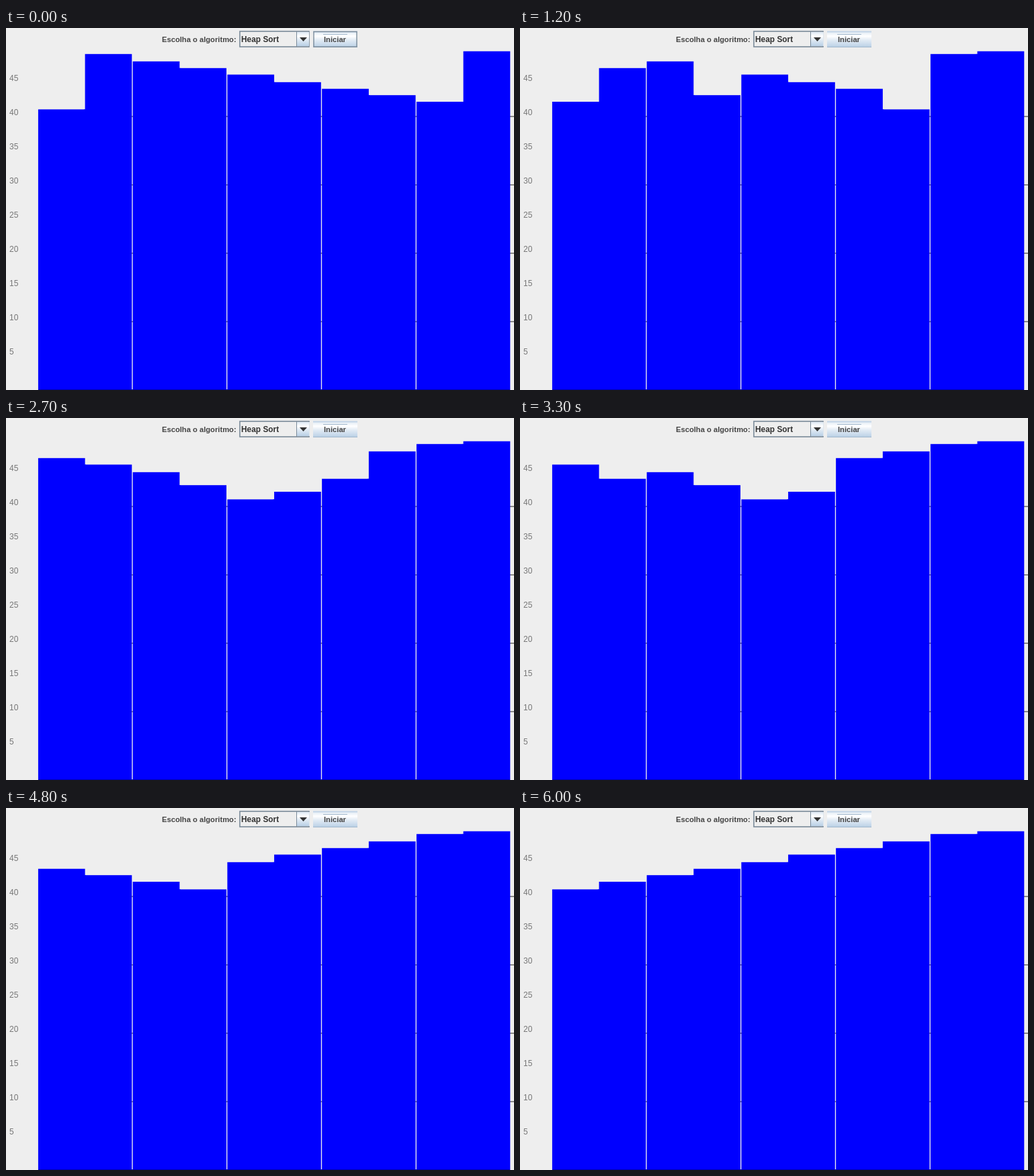
Recreate the animation shown at these times as an HTML page. Size 756 px wide and 540 px high, loop 6300 ms.

```html
<!DOCTYPE html>
<html lang="pt">
<head>
<meta charset="utf-8">
<title>Heap Sort</title>
<style>
  html, body { margin: 0; width: 100%; height: 100%; overflow: hidden; background: #eee; }
  svg { display: block; }
  text { font: bold 11.2px "Liberation Sans", Arial, sans-serif; fill: #444; }
  #labels text { font-weight: normal; font-size: 12px; fill: #777; }
  #combo { font-size: 11.9px; fill: #333; }
</style>
</head>
<body>
<svg width="756" height="540" viewBox="0 0 756 540">
  <defs>
    <linearGradient id="ocean" x2="0" y2="1">
      <stop offset="0" stop-color="#dde8f3"/>
      <stop offset=".3" stop-color="#fff"/>
      <stop offset=".5" stop-color="#e6eef6"/>
      <stop offset="1" stop-color="#b8cfe5"/>
    </linearGradient>
  </defs>
  <g id="grid" stroke="#666" stroke-width="1.4"></g>
  <g id="labels"></g>
  <g id="bars" fill="#00f"></g>
  <path d="M48 539.5H750" stroke="#0000b4"/>

  <text x="232" y="21">Escolha o algoritmo:</text>
  <rect x="348" y="5" width="103" height="23" fill="#eee" stroke="#7a8a99" stroke-width="1.6"/>
  <rect x="433" y="6" width="18" height="21" fill="url(#ocean)"/>
  <path d="M432.5 5V28" stroke="#7a8a99"/>
  <path d="M437 14H448L442.5 20Z" fill="#333"/>
  <text id="combo" x="350" y="20.5">Heap Sort</text>

  <rect x="457" y="5" width="66" height="24" fill="url(#ocean)"/>
  <path d="M457 5.5H523" stroke="#c3d5e8" stroke-width="2"/>
  <path d="M457 28.3H523" stroke="#a3b8cc"/>
  <path d="M472 9.5H508" stroke="#a3b8cc"/>
  <text x="473" y="21">Iniciar</text>
  <rect id="outline" x="458" y="5.5" width="64" height="22.5" fill="none" stroke="#7a8a99" stroke-width="1.4"/>
  <path id="edge" d="M451.5 6V27" stroke="#dde6ee"/>
</svg>
<script>
const STEP = 300;
const TOPS = [121.4, 110, 100.2, 90.7, 80.8, 69.5, 59.8, 49.8, 38.8, 34.7]; // smallest value first
const $ = id => document.getElementById(id);

function add(parent, tag, attrs, content = '') {
  const el = document.createElementNS('http://www.w3.org/2000/svg', tag);
  for (const key in attrs) el.setAttribute(key, attrs[key]);
  el.textContent = content;
  $(parent).append(el);
  return el;
}

// Sorts a full heap and records the array after every swap.
function heapSortStates() {
  const a = [9, 8, 7, 6, 5, 4, 3, 2, 1, 0], states = [];
  const swap = (i, j) => {
    [a[i], a[j]] = [a[j], a[i]];
    states.push([...a]);
  };
  for (let end = 9; end > 0; end--) {
    swap(0, end);
    for (let i = 0, child; (child = 2 * i + 1) < end; i = child) {
      if (child + 1 < end && a[child + 1] > a[child]) child++;
      if (a[i] >= a[child]) break;
      swap(i, child);
    }
  }
  return states;
}

for (let y = 132; y < 540; y += 102) add('grid', 'path', { d: `M48 ${y}H756` });
for (let n = 45, y = 79; n > 0; n -= 5, y += 51) add('labels', 'text', { x: 5, y }, n);

// Bars touch in pairs, with a thin gap after each pair.
const bars = TOPS.map((_, i) => add('bars', 'rect', {
  x: 47.9 + 140.75 * (i >> 1) + 69.7 * (i % 2),
  width: 69.7
}));
// A solid base under each pair keeps the seam closed.
const bases = bars.slice(0, 5).map((_, p) => add('bars', 'rect', { x: 116 + 140.75 * p, width: 3 }));
const states = heapSortStates();

function setTop(rect, top) {
  rect.setAttribute('y', top);
  rect.setAttribute('height', 540 - top);
}

function draw(now) {
  const step = Math.floor(now / STEP) % states.length;
  const tops = states[step].map(value => TOPS[value]);
  bars.forEach((bar, i) => setTop(bar, tops[i]));
  bases.forEach((base, p) => setTop(base, Math.max(tops[2 * p], tops[2 * p + 1])));
  const outlined = step < 3;
  $('outline').style.display = outlined ? '' : 'none';
  $('edge').style.display = outlined ? 'none' : '';
  requestAnimationFrame(draw);
}
draw(performance.now());
</script>
</body>
</html>
```
